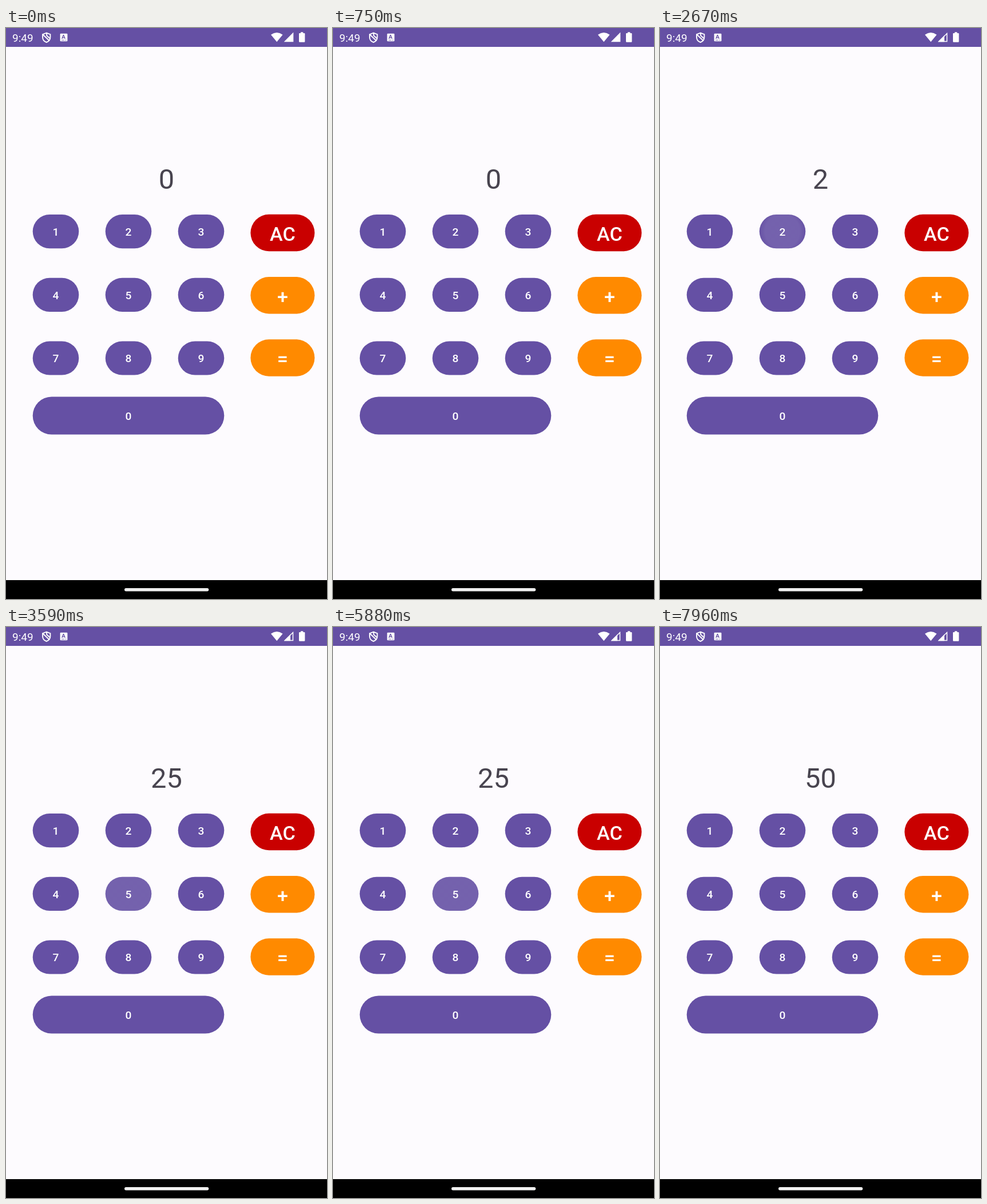
Recreate the animation shown at these times as an HTML page. Size 561 by 998 pixels, loop 8000 ms.

```html
<!DOCTYPE html>
<html lang="en">
<head>
<meta charset="utf-8">
<title>Calculator</title>
<style>
  html, body { margin: 0; width: 100%; height: 100%; overflow: hidden; background: #fdfbfe; }
  svg { display: block; width: 100%; height: 100%; }
  text { font-family: Roboto, sans-serif; fill: #fff; }
  .key { font-weight: 500; text-anchor: middle; }
  #display { font-size: 48.8px; fill: #48444f; text-anchor: middle; }
</style>
</head>
<body>
<svg id="stage" viewBox="0 0 561 998">
  <defs>
    <radialGradient id="glow">
      <stop offset="0.72" stop-color="#fff"/>
      <stop offset="1" stop-color="#fff" stop-opacity="0"/>
    </radialGradient>
  </defs>
  <rect width="561" height="998" fill="#fdfbfe"/>

  <rect width="561" height="33" fill="#6550a4"/>
  <text x="11" y="23.7" font-size="19">9:49</text>
  <g fill="none" stroke="#fff" stroke-width="1.9">
    <path d="M70.7 8.6L64 11.2V16C64 20.4 66.8 23.7 70.7 25C74.6 23.7 77.4 20.4 77.4 16V11.2Z"/>
    <path d="M64.5 11.5L75.8 22.3M71 9L71.2 13.2L77 18.5"/>
  </g>
  <rect x="94.6" y="9.7" width="12.8" height="13.6" rx="1.2" fill="#fff"/>
  <path d="M97.7 18.8L100.3 12.4H100.7L103.3 18.8M98.7 16.8H102.3" fill="none" stroke="#6550a4" stroke-width="1.3"/>
  <path d="M97 21.2H102M103.3 21.2H105.5" stroke="#6550a4" stroke-width="0.8"/>
  <path d="M463 11.7Q473.3 4.3 483.6 11.7L473.3 24.3Z" fill="#fff"/>
  <path id="signalFull" d="M502.3 7.6V24.2H485.7Z" fill="#fff"/>
  <g id="signalWeak">
    <path d="M501.5 9.5V23.4H487.6Z" fill="none" stroke="#fff" stroke-width="1.5"/>
    <path d="M497 12.9V24.2H485.7Z" fill="#fff"/>
  </g>
  <path d="M515 7.2H519.3V9H521.4Q522.4 9 522.4 10V23.6Q522.4 24.8 521.2 24.8H513.2Q512 24.8 512 23.6V10Q512 9 513 9H515Z" fill="#fff"/>

  <text id="display" x="280.5" y="281">0</text>
  <g id="keys"></g>

  <rect y="965" width="561" height="33" fill="#000"/>
  <rect x="207" y="979" width="147.3" height="5.5" rx="2.75" fill="#f0f0f0"/>
</svg>
<script>
const LOOP = 8000;
const PURPLE = '#6550a4', RED = '#c90000', ORANGE = '#ff8a00';
const byId = id => document.getElementById(id);
const clamp = v => Math.min(1, Math.max(0, v));

function add(parent, tag, attrs, text) {
  const node = document.createElementNS('http://www.w3.org/2000/svg', tag);
  for (const name in attrs) node.setAttribute(name, attrs[name]);
  if (text) node.textContent = text;
  parent.append(node);
  return node;
}

const keys = {};

function addKey(label, x, y, w, h, fill, size, baseline) {
  const box = { x, y, width: w, height: h, rx: h / 2 };
  const id = 'clip' + Object.keys(keys).length;
  add(add(byId('keys'), 'clipPath', { id }), 'rect', box);
  add(byId('keys'), 'rect', { ...box, fill });
  const layer = add(byId('keys'), 'g', { 'clip-path': `url(#${id})` });
  add(byId('keys'), 'text', { class: 'key', x: x + w / 2, y: baseline, 'font-size': size }, label);
  keys[label] = { layer, cx: x + w / 2, cy: y + h / 2 };
}

for (let i = 0; i < 9; i++) {
  const y = 326 + Math.floor(i / 3) * 110.7;
  addKey(String(i + 1), 46.7 + (i % 3) * 127, y, 80.6, 59.2, PURPLE, 19.2, y + 37);
}
addKey('0', 46.7, 644.6, 334.6, 66, PURPLE, 19.2, 685.3);
['AC', '+', '='].forEach((label, i) => {
  const y = 325.8 + i * 109.2;
  addKey(label, 427.4, y, 112, 64.5, i ? ORANGE : RED, 34.1, y + 46.2);
});

// Each tap: time, key, number shown after release, horizontal touch offset
const taps = [
  [2550, '2', '2', 0],
  [3250, '5', '25', 0],
  [4000, '+', '25', -20],
  [5080, '2', '2', 0],
  [5700, '5', '25', 0],
  [6560, '=', '50', -24]
].map(([at, label, shown, dx]) => {
  const { layer, cx, cy } = keys[label];
  const ripple = add(layer, 'circle', { cx: cx + dx, cy, fill: 'url(#glow)' });
  return { at, shown, ripple };
});

function draw(t) {
  let shown = '0';
  for (const tap of taps) {
    const age = t - tap.at;
    if (age >= 100) shown = tap.shown;
    const alpha = clamp(age / 75) * (1 - clamp((age - 350) / 350));
    tap.ripple.setAttribute('r', 15 + 100 * clamp(age / 450));
    tap.ripple.setAttribute('opacity', 0.1 * alpha);
  }
  byId('display').textContent = shown;
  const weak = t >= 2500;
  byId('signalFull').style.display = weak ? 'none' : '';
  byId('signalWeak').style.display = weak ? '' : 'none';
}

const start = performance.now();
function tick() {
  draw((performance.now() - start) % LOOP);
  requestAnimationFrame(tick);
}
draw(0);
requestAnimationFrame(tick);
</script>
</body>
</html>
```
